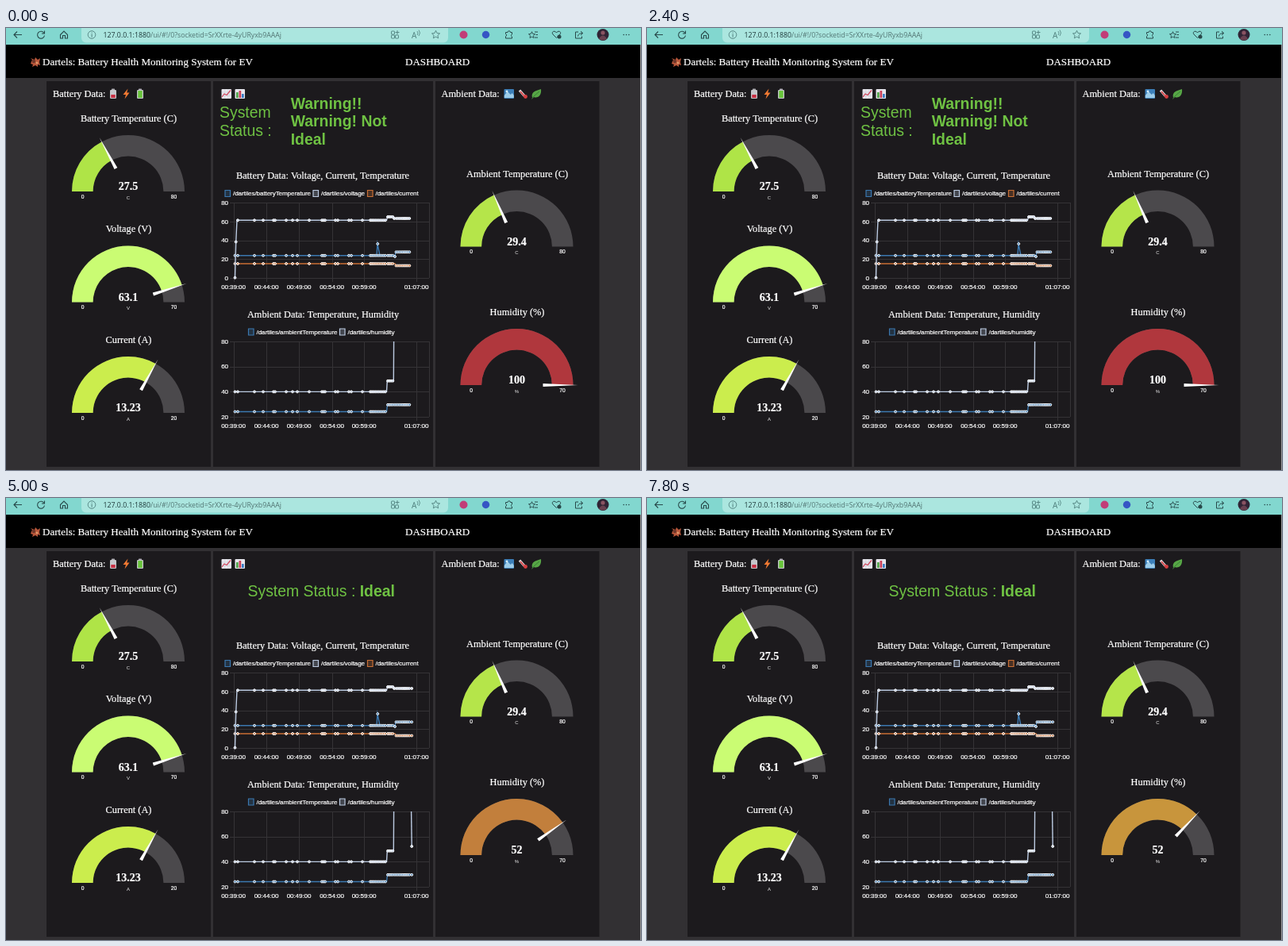
An HTML page with a canvas that plays this animation: 800 px wide and 557 px high, repeating every 8000 ms.

```html
<!DOCTYPE html>
<html lang="en">
<head>
<meta charset="utf-8">
<title>Battery dashboard</title>
<style>
html, body { margin: 0; width: 100%; height: 100%; overflow: hidden; background: #323033; }
canvas { display: block; width: 800px; height: 557px; }
</style>
</head>
<body>
<canvas id="stage"></canvas>
<script>
const W = 800, H = 557, LOOP = 8000, STEP = 200;
const CHANGE = 4600, TURN = 700;
const SERIF = '"Liberation Serif", serif';
const SANS = '"Liberation Sans", sans-serif';
const UI = '"Open Sans", sans-serif';
const CHART_FONT = '8.1px ' + SANS;
const TOPIC = '/dartiles/';
const GRID = '#353336', BLUE = '#3b78b0', PALE = '#bccbe2', ORANGE = '#c96f35', GREEN = '#6fc243';

const canvas = document.getElementById('stage');
const ctx = canvas.getContext('2d');
const dpr = window.devicePixelRatio || 1;
canvas.width = W * dpr;
canvas.height = H * dpr;

function rect(x, y, w, h, color) {
  ctx.fillStyle = color;
  ctx.fillRect(x, y, w, h);
}

function box(x, y, w, h, r, fill, stroke, width = 1) {
  ctx.beginPath();
  ctx.roundRect(x, y, w, h, r);
  paint(fill, stroke, width);
}

function disc(x, y, r, fill, stroke, width = 1) {
  ctx.beginPath();
  ctx.arc(x, y, r, 0, 7);
  paint(fill, stroke, width);
}

function path(points, fill, stroke, width = 1, close = false) {
  ctx.beginPath();
  points.forEach(([x, y]) => ctx.lineTo(x, y));
  if (close) ctx.closePath();
  paint(fill, stroke, width);
}

function shape(d, x, y, fill, stroke, width = 1) {
  ctx.save();
  ctx.translate(x, y);
  const p = new Path2D(d);
  if (fill) { ctx.fillStyle = fill; ctx.fill(p); }
  if (stroke) { ctx.strokeStyle = stroke; ctx.lineWidth = width; ctx.stroke(p); }
  ctx.restore();
}

function paint(fill, stroke, width) {
  if (fill) { ctx.fillStyle = fill; ctx.fill(); }
  if (stroke) { ctx.strokeStyle = stroke; ctx.lineWidth = width; ctx.stroke(); }
}

function text(str, x, y, font, color = '#fff', align = 'left') {
  ctx.font = font;
  ctx.fillStyle = color;
  ctx.textAlign = align;
  ctx.fillText(str, x, y);
  // A hairline outline gives white text its weight on the dark ground
  if (color === '#fff') {
    ctx.strokeStyle = color;
    ctx.lineWidth = .22;
    ctx.strokeText(str, x, y);
  }
}

function chartText(str, x, y, align) {
  ctx.letterSpacing = '-0.1px';
  text(str, x, y, CHART_FONT, '#fff', align);
  ctx.letterSpacing = '0px';
}

function star(x, y, r, color) {
  const pts = Array.from({ length: 10 }, (_, i) => {
    const a = -Math.PI / 2 + i * Math.PI / 5, d = i % 2 ? r * .48 : r;
    return [x + d * Math.cos(a), y + d * Math.sin(a)];
  });
  path(pts, null, color, .9, true);
}

function browserBar() {
  const ink = '#28494a', soft = '#4f7f7d';
  rect(0, 0, W, 21, '#82d7cf');
  box(95, -6, 462, 24.5, 6, '#abe6df');

  shape('M5 0H-5M-1-4L-5 0L-1 4', 15, 8.5, null, ink, 1.1);
  shape('M4-2A4.5 4.5 0 1 0 4.5 1M4.5-5V-1.5H1', 44, 8.5, null, ink, 1.1);
  shape('M-4.5 0L0-4.5L4.5 0V4.5H1.5V1H-1.5V4.5H-4.5Z', 73, 8.5, null, ink, 1.1);
  disc(108, 8.5, 4.8, null, soft, .9);
  rect(107.6, 7.5, 1, 4, soft);
  rect(107.6, 5.5, 1, 1, soft);

  const host = '127.0.0.1:1880';
  const font = '8.78px ' + UI;
  text(host, 122.5, 11.7, font, '#1f3b3c');
  text('/ui/#!/0?socketid=SrXXrte-4yURyxb9AAAj', 122.5 + ctx.measureText(host).width, 11.7, font, '#527573');

  [[485.5, 4], [485.5, 9], [490.5, 9]].forEach(([x, y]) => box(x, y, 4, 4, .5, null, soft, .9));
  shape('M0-2.5V2.5M-2.5 0H2.5', 493, 5.5, null, soft, .9);
  text('A', 511, 12.5, '10px ' + UI, soft);
  shape('M0-3Q2-1 0 2M2-4.5Q5-1 2 3', 518, 7, null, soft, .8);
  star(541.5, 8.5, 5.3, soft);
  disc(576.5, 8.5, 5, '#c13d78');
  disc(604.5, 8.5, 4.7, '#3555c4');
  shape('M-4-3H-1.5A1.7 1.7 0 0 1 2-3H4V-.5A1.6 1.6 0 0 0 4 2.5V4.5H-4V2A1.6 1.6 0 0 0-4-1Z', 633.5, 8.5, null, ink);
  star(662.5, 9, 4.3, ink);
  shape('M2-3.5H6M3.5 0H6M2 3.5H6', 664, 8.5, null, ink);
  shape('M0 4L-4.5-.5C-7-4-2-6 0-2.5C2-6 7-4 4.5-.5Z', 693.5, 8.5, null, ink);
  disc(697, 11, 2.5, ink);
  shape('M-1-3.5H-4.5V4.5H3.5V2M-1.5 2Q-1-2 4-2M2-4.5L4.8-2L2 .5', 722, 8.5, null, ink);
  disc(752, 8.5, 7.5, '#302435');
  disc(752, 6, 2.6, '#8a5362');
  shape('M-5 5Q0-3 5 5Q0 9-5 5Z', 752, 8.5, '#68404f');
  [-3.3, 0, 3.3].forEach(d => disc(781.5 + d, 8.5, .8, ink));
}

function battery(x, y, color, level) {
  box(x - 2, y - 6.5, 4, 2, .5, '#aaa9ae');
  box(x - 4, y - 5, 8, 11, 1.2, '#c5c5ca');
  rect(x - 2.7, y + 5 - level, 5.4, level, color);
}

function icons() {
  // Small animal beside the title
  shape('M-6 2L-4-3L-6-5L-1-3L0-6L3-3L6-5L5 0L6 4L3 3L3 6L0 4L-4 6L-3 3Z', 37, 43, '#b9573b');
  disc(35, 42, 2.2, '#6e382b');
  disc(39, 44, 1.4, '#e09d6c');

  battery(135, 83, '#c92f43', 4);
  shape('M2-6.5L-4 1H-.5L-2 6.5L4-1.5H.7Z', 151.5, 83, '#f47a32');
  battery(169, 83, '#68c43a', 9);

  box(271.5, 77, 12.5, 12, 1, '#e7e5ec');
  shape('M-6-2H6M-6 2H6M-2-6V6M2-6V6', 277.7, 83, null, '#c3cbd7', .5);
  path([[272, 87], [275, 83], [278, 84.5], [283, 78.5]], null, '#d0455b', 1.2);
  box(288.5, 77, 12.5, 12, 1, '#e7e5ec');
  rect(290, 81, 2.7, 7, '#52a64b');
  rect(293.5, 79, 2.7, 9, '#cb435b');
  rect(297, 83, 2.7, 5, '#367cc5');

  box(627.5, 77, 12.5, 12, 1, '#3c7fb9');
  shape('M-6 2L-2-3L2 1L4-1L6 2V5H-6Z', 633.8, 83, '#9dcde9');
  disc(631, 80, 1.4, '#d7edf7');
  path([[647, 78.5], [653, 85.5]], null, '#e3dade', 3.2);
  path([[648, 80], [654, 87]], null, '#d63e40', 1.6);
  disc(654.5, 86.5, 2.4, '#d63e40');
  shape('M-5 5C-7-3 0-4 6-6C7 2 2 6-3 4L-6 7Z', 668, 83, '#58a746');
  shape('M-5 5Q0 0 4-3', 668, 83, null, '#2e7633', .8);
}

function gauge(g) {
  const { x, y, frac, color } = g;
  const arc = (from, to, fill) => {
    ctx.beginPath();
    ctx.arc(x, y, 71, Math.PI * (1 + from), Math.PI * (1 + to));
    ctx.arc(x, y, 44.4, Math.PI * (1 + to), Math.PI * (1 + from), true);
    ctx.closePath();
    paint(fill);
  };
  arc(0, 1, '#4b494c');
  arc(0, frac, color);

  ctx.save();
  ctx.translate(x, y);
  ctx.rotate(Math.PI * (1 + frac));
  path([[33, -2.1], [77, 0], [33, 2.1]], '#fff', null, 1, true);
  ctx.restore();

  text(g.title, x + .5, g.titleY, '12.35px ' + SERIF, '#fff', 'center');
  text(g.value, x, y - 2, 'bold 14px ' + SERIF, '#fff', 'center');
  text(g.unit, x, y + 9.5, '6px ' + SANS, '#eee', 'center');
  text('0', x - 57.5, y + 8.5, '6.7px ' + SANS, '#fff', 'center');
  text(g.max, x + 57.5, y + 8.5, '6.7px ' + SANS, '#fff', 'center');
}

function mix(a, b, k) {
  return `rgb(${a.map((v, i) => Math.round(v + (b[i] - v) * k))})`;
}

function gauges(turn, ideal) {
  const items = [
    ['Battery Temperature (C)', 154, 206, 117.5, '27.5', 80, 'C', '#afe447'],
    ['Voltage (V)', 154, 345.5, 257, '63.1', 70, 'V', '#cafc73'],
    ['Current (A)', 154, 485, 397, '13.23', 20, 'A', '#cbed4d'],
    ['Ambient Temperature (C)', 643.5, 275.5, 187.5, '29.4', 80, 'C', '#b5e54a']
  ];
  items.forEach(([title, x, y, titleY, value, max, unit, color]) =>
    gauge({ title, x, y, titleY, value, max, unit, color, frac: value / max }));
  gauge({
    title: 'Humidity (%)', x: 643.5, y: 450, titleY: 362, max: 70, unit: '%',
    value: ideal ? '52' : '100',
    frac: 1 + (52 / 70 - 1) * turn,
    color: mix([176, 55, 61], [200, 149, 60], turn)
  });
}

function axes(top, labels) {
  const bottom = top + 95;
  labels.forEach((label, i) => {
    const y = top + 95 * i / (labels.length - 1);
    rect(282, Math.round(y), 251, 1, GRID);
    chartText(label, 280, y + 2.8, 'right');
  });
  const times = { '00:39:00': 286.5, '00:44:00': 328, '00:49:00': 369, '00:54:00': 410.5, '00:59:00': 451, '01:07:00': 517 };
  for (const [label, x] of Object.entries(times)) {
    rect(Math.round(x), top, 1, 95 + 5, GRID);
    chartText(label, x, bottom + 13.5, 'center');
  }
  rect(533, top, 1, 95, GRID);
}

function legend(y, items) {
  items.forEach(([x, label, color]) => {
    box(x, y - 4, 6.5, 8, 0, color + '40', color, 1.2);
    chartText(TOPIC + label, x + 10, y + 2.8, 'left');
  });
}

const sparse = [288.5, 292, 313, 324, 337, 339, 353, 361, 367, 382, 398, 400, 402, 415, 418, 432, 435, 449];
const run = (from, to, gap = 2.1) =>
  Array.from({ length: Math.floor((to - from) / gap) + 1 }, (_, i) => from + i * gap);
const early = sparse.concat(run(459, 479));
const middle = run(481, 488);
const late = run(491.5, 510);

function dots(xs, y, color) {
  xs.forEach(x => disc(x, y, 1.45, color, '#fff', 1));
}

function batteryChart(shift) {
  const end = 510 + shift;
  const tail = shift ? late.concat(end) : late;
  text('Battery Data: Voltage, Current, Temperature', 399, 189.5, '12.3px ' + SERIF, '#fff', 'center');
  legend(208.5, [[276, 'batteryTemperature', BLUE], [387, 'voltage', PALE], [455.5, 'current', ORANGE]]);
  axes(220, ['80', '60', '40', '20', '0']);

  path([[288, 297], [490, 297], [492, 299.5], [end, 299.5]], null, ORANGE, 1.4);
  dots(early.concat(middle), 297, ORANGE);
  dots(tail, 299.5, ORANGE);

  path([[288, 286.7], [467, 286.7], [468, 272], [471, 286.7], [490, 287], [491, 282.3], [end, 282.3]], null, BLUE, 1.4);
  dots(early.concat(middle), 286.7, BLUE);
  dots([468.3], 272, BLUE);
  dots([490], 288, BLUE);
  dots(tail, 282.3, BLUE);

  path([[288.5, 315], [289.7, 269.5], [291, 242.3], [479.5, 242.3], [480.5, 238], [488, 238], [489, 240], [end, 240]], null, PALE, 1.4);
  dots([288.5], 314.7, PALE);
  dots([289.7], 269.5, PALE);
  dots(early.slice(1), 242.3, PALE);
  dots(middle, 238, PALE);
  dots([489].concat(tail), 240, PALE);
}

function ambientChart(shift) {
  const end = 510 + shift;
  text('Ambient Data: Temperature, Humidity', 399.5, 364.5, '12.3px ' + SERIF, '#fff', 'center');
  legend(383, [[305.5, 'ambientTemperature', BLUE], [420.5, 'humidity', PALE]]);
  axes(395, ['80', '60', '40', '20']);

  path([[288, 483.5], [479.5, 483.5], [480.5, 474.8], [end, 474.8]], null, BLUE, 1.4);
  dots(early, 483.5, BLUE);
  dots(middle.concat(489.5, late, shift ? end : []), 474.8, BLUE);

  path([[288, 458.4], [479.5, 458.4], [480.3, 444.7], [488.3, 444.7], [488.6, 395]], null, PALE, 1.4);
  dots(early, 458.4, PALE);
  dots(middle, 444.7, PALE);
  if (shift) {
    path([[510.6, 395], [end, 439]], null, PALE, 1.4);
    dots([end], 439, PALE);
  }
}

function status(ideal) {
  const plain = '19.4px ' + SANS, bold = 'bold ' + plain;
  if (ideal) {
    const lead = 'System Status : ';
    text(lead, 304.5, 124.3, plain, GREEN);
    text('Ideal', 304.5 + ctx.measureText(lead).width, 124.3, bold, GREEN);
    return;
  }
  ['System', 'Status :'].forEach((s, i) => text(s, 269, 113.3 + 22.3 * i, plain, GREEN));
  ['Warning!!', 'Warning! Not', 'Ideal'].forEach((s, i) => text(s, 358.7, 102 + 22.3 * i, bold, GREEN));
}

function draw(t) {
  const p = Math.min(1, Math.max(0, (t - CHANGE) / TURN));
  const turn = Math.pow(p, .48);
  const ideal = t >= CHANGE;
  const shift = ideal ? 1.2 : 0;

  ctx.setTransform(dpr, 0, 0, dpr, 0, 0);
  rect(0, 0, W, H, '#323033');
  browserBar();
  rect(0, 21, W, 42, '#000');
  rect(799, 21, 1, H - 21, '#9b9a9c');
  [[51, 207], [261, 277], [541, 206.5]].forEach(([x, w]) => rect(x, 67, w, 486, '#1c1a1d'));

  text('Dartels: Battery Health Monitoring System for EV', 46, 47, '13.07px ' + SERIF);
  text('DASHBOARD', 503, 47, '13.07px ' + SERIF);
  text('Battery Data:', 59, 87, '12.4px ' + SERIF);
  text('Ambient Data:', 548.5, 87, '12.4px ' + SERIF);
  icons();
  status(ideal);
  batteryChart(shift);
  ambientChart(shift);
  gauges(turn, ideal);
}

function tick() {
  const t = performance.now() % LOOP;
  draw(Math.floor(t / STEP) * STEP);
  requestAnimationFrame(tick);
}
tick();
</script>
</body>
</html>
```
